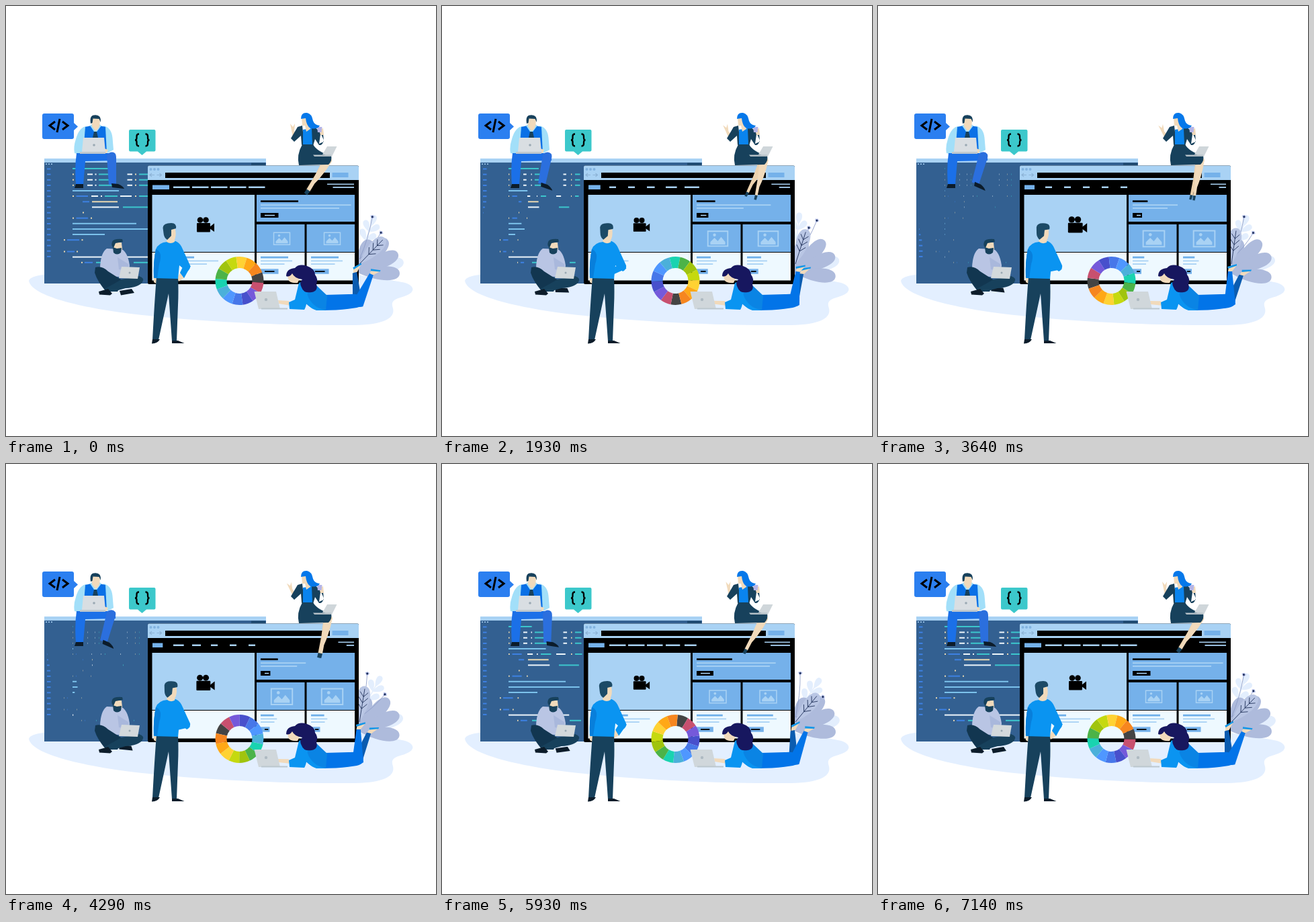
These frames come from a looping animation (640 by 640 pixels, 7.21 s). An HTML page:

```html
<!DOCTYPE html>
<html lang="en">
<head>
<meta charset="utf-8">
<title>Web design team</title>
<style>
html, body { margin: 0; width: 100%; height: 100%; overflow: hidden; background: #fff; }
svg { display: block; width: 100%; height: 100%; }
.navy { fill: #17415c; }
.skin { fill: #f1dabb; }
.light { fill: #a9d2f4; }
.blue { fill: #75b1ea; }
.pale { fill: #eef9ff; }
.grey { fill: #d0d7db; }
.shoe { fill: #0c1c2a; }
.jeans { fill: #1b70e8; }
.shirt { fill: #0a94f1; }
.line { fill: none; stroke: #000; stroke-width: 3; }
.thin { fill: none; stroke: #8db3d6; stroke-width: 1.2; }
</style>
</head>
<body>
<svg viewBox="0 0 640 640">
  <path fill="#e3efff" d="M34 409Q36 402 57 400L525 400C560 408 582 408 597 413C610 419 608 428 590 433C575 437 573 441 576 450C579 463 566 474 520 475C400 476 260 468 170 456C100 446 38 430 34 409Z"/>
  <g id="plants"></g>

  <!-- code editor -->
  <path fill="#336091" d="M57 230H387V413H57Z"/>
  <path class="light" d="M57 227H387V233H57Z"/>
  <path fill="#1f4a70" d="M365 233.500h21v3.500h-21z"/>
  <path class="light" d="M59 234.500h2v1.500h-2zM63 234.500h2v1.500h-2zM67 234.500h2v1.500h-2z"/>
  <g id="code"></g>

  <!-- browser -->
  <rect x="211" y="237.500" width="314" height="176.500" rx="2"/>
  <path class="light" d="M211 259V239.500Q211 237.500 213 237.500H523Q525 237.500 525 239.500V259Z"/>
  <g fill="#82b3df"><circle cx="215.500" cy="243" r="2"/><circle cx="221" cy="243" r="2"/><circle cx="226.500" cy="243" r="2"/></g>
  <path class="thin" d="M221 251.500H214.500M217 249L214 251.500L217 254M224.500 251.500H231M228.500 249L231.500 251.500L228.500 254"/>
  <path d="M237 248H482V256H237Z"/>
  <path class="blue" d="M485.500 248H509.500V255H485.500Z"/>
  <path class="light" d="M217.500 281H370V366H217.500Z"/>
  <path class="blue" d="M373 281H519V321H373ZM373 325H444.500V366H373ZM447.500 325H519V366H447.500Z"/>
  <path class="pale" d="M217.500 367H370V408.500H217.500ZM373 367H444.500V408.500H373ZM447.500 367H519V408.500H447.500Z"/>
  <g id="camera">
    <circle cx="289" cy="318.500" r="4.300"/><circle cx="297.500" cy="318.500" r="4.300"/>
    <rect x="284" y="323" width="20" height="13.500" rx="1"/>
    <path d="M303 329L310 323.500V336L303 331Z"/>
  </g>
  <g id="images"></g>
  <g id="page"></g>

  <!-- speech bubbles -->
  <path fill="#2b7ff0" d="M57 160H98Q101 160 101 163V174L107 179.500L101 185V195Q101 198 98 198H57Q54 198 54 195V163Q54 160 57 160Z"/>
  <path class="line" d="M73 172L65 178L73 184M80 168L76 188M84 172L92 178L84 184"/>
  <path fill="#3cc8cb" d="M185 184H220.500Q222.500 184 222.500 186V214.500Q222.500 216.500 220.500 216.500H209L202.500 222L196 216.500H185Q183 216.500 183 214.500V186Q183 184 185 184Z"/>
  <path class="line" style="stroke-width:2.300" d="M198 190.500Q194.500 190.500 194.500 194V196.500Q194.500 199.500 192 199.500Q194.500 199.500 194.500 202.500V205Q194.500 208.500 198 208.500M207.500 190.500Q211 190.500 211 194V196.500Q211 199.500 213.500 199.500Q211 199.500 211 202.500V205Q211 208.500 207.500 208.500"/>

  <!-- man on the editor -->
  <path fill="#a2dff9" d="M120 179Q109 180 104 198Q100 210 102 219L113 222L117 200ZM145 178Q157 181 158.500 196L160 214L151 219L146 200Z"/>
  <path fill="#0a70e6" d="M118 180L127 178H139L148 180L150 219H115Z"/>
  <path fill="#a2dff9" d="M125 178L128 176H139L142 178L133 190Z"/>
  <path class="navy" d="M131 187H135L137 196H129Z"/>
  <path class="skin" d="M127 166H140L139.500 177Q138 184 133 186L128 179Z"/>
  <path class="navy" d="M126 175Q124 163 131 162.500Q142 161 141 173L138.500 168L129.500 167.500L128.500 174Z"/>
  <path class="jeans" d="M105 219H157Q164 220 163 230L118 231L115 266H104Q102 240 105 219Z"/>
  <path class="shoe" d="M104 265H115V271H102Z"/>
  <g id="shin">
    <path fill="#2b6fde" d="M150 222Q156 215 162 219Q164 221 164 226V266H153Z"/>
    <path class="shoe" d="M157 264L167 265Q174 268 176 272L158 270Z"/>
  </g>
  <path class="skin" d="M146 212L152 214L150 219H144Z"/>
  <path fill="#d9dee2" d="M115 196H146L148 217H113Z"/>
  <path fill="#bfc8ce" d="M110 217H148V220H110Z"/>
  <circle cx="131" cy="207" r="1.800" fill="#9aa9b3"/>

  <!-- man sitting cross-legged -->
  <path class="shoe" id="toe" d="M169 424L187 421L191 427L171 430.500Z"/>
  <path fill="#b9c5e4" d="M150 361Q141 367 140 389L152 402L182 404L184 386Q181 366 172 362Z"/>
  <path fill="#a9b8dc" d="M166 374L182 384L183 394L168 392Z"/>
  <path class="skin" d="M160 352H172L173 362L166 367L160 363Z"/>
  <path class="navy" d="M158 351Q160 346 173 347L174 351L163 353L160 360Q156 357 158 351ZM159 359L165 361L172 360L171 367Q165 372 160 367Z"/>
  <path fill="#123650" d="M133 389Q143 386 152 395L174 409L170 417L166 425H149Q136 410 132 397Z"/>
  <path class="navy" d="M147 421L172 407L198 402Q207 405 203 411Q197 419 178 420L160 425Z"/>
  <path class="shoe" d="M138 425L152 421L158 428L155 430.500L139 429.500Z"/>
  <path fill="#d3d9dc" d="M172 388L199 389L196 406L168 405Z"/>
  <circle cx="184" cy="397" r="1.500" fill="#9aa9b3"/>

  <g id="wheel"></g>

  <!-- standing man -->
  <g id="forearm">
    <path class="skin" d="M260 396L266 404L257 410L255 404Z"/>
    <path class="shirt" d="M275 387L265 405L259 397L265 384Z"/>
  </g>
  <path class="skin" d="M219 402L226 405L225 414L220 411Z"/>
  <path class="navy" d="M224 403H256Q257 425 256 445L254 499H247L242 428L227 497H218Q221 440 224 403Z"/>
  <path class="shoe" d="M218 496L229 496Q226 502 217 502.500ZM247 498H256L265.500 502H247Z"/>
  <path class="shirt" d="M223 362Q227 352 240 351L252 350Q259 352 263 362Q268 373 274 386Q275 392 269 395L258 386L256 406L220 405Q219 380 223 362Z"/>
  <path fill="#087fdb" d="M223 362Q234 366 228 384L225 405L220 404Q219 380 223 362Z"/>
  <g id="head">
    <path class="skin" d="M240 343H251L251 351Q245 355 239 351ZM243 330L252 332Q254 344 250 349L242 346Z"/>
    <path fill="#1c4a66" d="M233.500 330Q234 323 246 323Q254 323 253 331L246 333L246 342L240 348Q235 345 234.500 338Z"/>
  </g>

  <!-- woman on the browser -->
  <g id="legA"><path fill="#ecd2ae" d="M473 228Q479 220 486 228Q486 250 481 270V284H477L476 258Z"/><path class="navy" d="M477 283H481L480.500 290H477Z"/></g>
  <g id="legB"><path class="skin" d="M473 228Q479 220 486 228Q486 250 481 270V284H477L476 258Z"/><path class="navy" d="M477 283H481L480.500 290H477Z"/></g>
  <path class="navy" d="M441 206H457Q463 217 484 223Q486 230 480 236L436 237Q432 222 441 206Z"/>
  <path fill="#cfd6da" d="M471 221L478 209H492.500L485 224Z"/>
  <path fill="#b4bfc6" d="M457 221.500H484L483 224H459Z"/>
  <g id="hand"><path class="skin" d="M427 196L425 185L423 175L427 180L430 175L429 186L433 194Z"/></g>
  <path class="navy" d="M441 178L434 180L424 197L429 202L439 193L440 207L444 206ZM455 179Q466 181 473 200Q471 208 466 207L460 198L457 208L454 204ZM466 205L473 202L472 190L468 191Z"/>
  <path fill="#0a84ee" d="M442 184L455 182L456 206H442Z"/>
  <path class="skin" d="M468 192L466 184L472 182L473 192ZM440 166H446L449 177L453 183L447 187L445 178H441Z"/>
  <path fill="#b5b5e6" d="M463 180H470.500L469.500 188H464Z"/>
  <path fill="#0578ea" d="M439 168Q439 158 448 159Q455 160 457 171Q459 177 467 178Q464 184 453 182Q447 178 446 167Z"/>

  <!-- woman lying down -->
  <g id="farLeg">
    <path fill="#0b5cb0" d="M516 442L519 398L525 392L530 442Z"/>
    <path class="skin" d="M520 397L521 389L532 386L526 396Z"/>
    <path fill="#1597e8" d="M520 389L533 383L533 385.500L521 392Z"/>
  </g>
  <path fill="#0274e8" d="M474 430L512 429Q529 427 531 436Q534 446 522 449Q500 453 470 453Z"/>
  <g id="nearLeg">
    <path fill="#0274e8" d="M515 444L521 394H527L532 444Q524 451 515 444Z"/>
    <path class="skin" d="M521 395L522 388L534 386L527 395Z"/>
    <path fill="#1597e8" d="M520 388L534 384V386.500L521 391Z"/>
  </g>
  <path fill="#0a84e4" d="M440 411Q452 404 460 414L478 431L476 453H464Q446 448 438 430Z"/>
  <path class="skin" id="fingers" d="M405 438L421 439L424 446L406 443Z"/>
  <path class="shirt" d="M436 412Q446 408 449 420Q449 444 444 452L422 451L421 441L430 437ZM447 424Q452 448 476 453H462Q446 448 443 430Z"/>
  <path class="skin" d="M418 399L431 396L438 404L434 412Q426 413 421 409Z"/>
  <path fill="#17175f" d="M417 402Q417 391 430 390Q436 383 448 387Q460 391 460 400Q465 406 462 414Q465 424 455 426Q443 428 440 419Q436 412 441 407Q429 405 426 398Q422 404 417 402Z"/>
  <path class="grey" d="M369.500 425H402L408 451H376Z"/>
  <path fill="#bcc7ce" d="M380 449.500H419V451.500H380Z"/>
  <circle cx="387" cy="437" r="2.200" fill="#aebac2"/>
</svg>
<script>
const LOOP = 7210;
const $ = id => document.getElementById(id);

function add(parent, tag, attrs) {
  const el = document.createElementNS("http://www.w3.org/2000/svg", tag);
  for (const key in attrs) el.setAttribute(key, attrs[key]);
  return parent.appendChild(el);
}

function ease(x) {
  x = Math.min(1, Math.max(0, x));
  return x < .5 ? 4 * x ** 3 : 1 - 4 * (1 - x) ** 3;
}

// Falls from 1 to 0 between d0 and d1, climbs back between u0 and u1.
const wave = (d0, d1, u0, u1) => t =>
  t < u0 ? 1 - ease((t - d0) / (d1 - d0)) : ease((t - u0) / (u1 - u0));
const main = wave(100, 3200, 3600, 7000);
const lead = wave(0, 2950, 3100, 7060);
const late = wave(500, 3700, 4000, 7200);
const turn = t => 2 * Math.PI * t / LOOP;

const updates = [];

function bar(parent, x, y, w, h, fill, min, pace, fromRight) {
  const el = add($(parent), "rect", { x, y, height: h, fill });
  updates.push(t => {
    const width = min + (w - min) * pace(t);
    el.setAttribute("width", width);
    if (fromRight) el.setAttribute("x", x + w - width);
  });
}

function swing(el, cx, cy, angle) {
  updates.push(t => el.setAttribute("transform", `rotate(${angle(t)} ${cx} ${cy})`));
}

// Editor lines
const W = "#eef6fb", T = "#3cc6cd", B = "#3d80e2", C = "#7cc2ec", S = "#ead9b2";
const lowRows = wave(100, 3000, 3400, 7000);
const midRows = wave(250, 3400, 3900, 7100);
const topRows = wave(500, 3500, 4100, 7200);

function codeRow(y, pace, ...spans) {
  for (const [x, w, fill] of spans) bar("code", x, y - 1, w, 2, fill, .4, pace);
}
codeRow(242, wave(1000, 3600, 4400, 7200), [99, 55, T]);
for (const y of [250.5, 258.7, 266.8])
  codeRow(y, topRows, [99, 2, S], [121, 8, W], [132.5, 2, W], [138, 26, T], [180.5, 7.5, W], [192, 2, S], [198, 13, T]);
codeRow(275, midRows, [99, 69, C]);
codeRow(283, midRows, [99, 2, S], [104.5, 17.5, B], [127, 10, W], [141, 2, W], [147, 19, T], [170, 17, W], [192, 2, S], [198, 13, T]);
codeRow(291.3, midRows, [114, 10, B], [128, 38, S]);
codeRow(299.4, midRows, [128, 40, W], [174, 37, T]);
codeRow(307.5, midRows, [114, 2, S]);
codeRow(315.7, midRows, [99, 2, S], [104.5, 17.5, B], [126, 2, S]);
codeRow(323.8, lowRows, [99, 95, C]);
codeRow(332, lowRows, [99, 118, C]);
codeRow(340, lowRows, [99, 48, C]);
codeRow(348.2, midRows, [86, 2, S], [91, 18, B], [112.5, 2, S]);
codeRow(365.5, midRows, [86, 2, S], [91, 11, B], [105, 2, S]);
codeRow(373.6, midRows, [99, 112, W]);
codeRow(381.8, midRows, [112, 2, S], [117, 12, B], [134, 20, T], [190, 21, T]);
for (let i = 0; i < 17; i++) {
  const gone = 1200 + (16 - i) * 115;
  bar("code", 61, 241.5 + i * 8.15, 5.5, 2, B, 0, wave(gone - 600, gone, gone + 1600, gone + 2400));
}

// Browser content
const LIGHT = "#a9d2f4", BLUE = "#6fafea";
bar("page", 218, 266.5, 25, 6.5, "#75b1ea", 15, main);
[[0, 1500, 3600, 5100], [250, 2050, 3600, 5450], [500, 2550, 4000, 6600], [900, 2900, 4200, 7000], [1000, 3600, 4600, 7200]]
  .forEach((times, i) => bar("page", 249 + 28 * i, 268.5, 24.5, 2.5, LIGHT, 10, wave(...times)));
bar("page", 478, 264.5, 40, 1.5, LIGHT, 23, main, true);
bar("page", 486.5, 269, 31.5, 1.8, LIGHT, 10.5, main, true);
bar("page", 379, 289.3, 56, 2.7, "#000", 22, lead);
bar("page", 379, 295.3, 134.5, 1.8, LIGHT, 67, late);
bar("page", 379, 300, 117, 1.8, LIGHT, 52, main);
bar("page", 379, 308, 26.5, 7, "#000", 14, main);
bar("page", 385, 310.8, 15, 1.6, LIGHT, 6, main);
bar("page", 223, 372.7, 57, 2.8, BLUE, 22, lead);
bar("page", 223, 378.5, 93, 1.8, LIGHT, 40, main);
bar("page", 223, 383.2, 76, 1.8, LIGHT, 34, main);
for (const x of [379, 454]) {
  bar("page", x, 372.7, 41, 2.8, BLUE, 17, lead);
  bar("page", x, 378.5, 47, 1.8, LIGHT, 23.5, main);
  bar("page", x, 383.2, 35.5, 1.8, LIGHT, 20, main);
  bar("page", x, 391.3, 26.5, 7.5, "#75b1ea", 13, main);
  bar("page", x + 6, 394.2, 14.5, 1.8, "#000", 5, main);

  const icon = add($("images"), "g", {});
  add(icon, "path", { d: "M-12-9H12V9H-12Z", fill: "none", stroke: LIGHT, "stroke-width": 1.5 });
  add(icon, "path", { d: "M-9 7V4L-4-1L0 3L4-2L9 4V7Z", fill: LIGHT });
  add(icon, "circle", { cx: -4, cy: -4.5, r: 1.8, fill: LIGHT });
  updates.push(t => icon.setAttribute("transform", `translate(${x + 31.5} 346.3) scale(${1.32 - .32 * main(t)})`));
}
updates.push(t => {
  const size = .9875 + .0575 * Math.cos(2 * turn(t)) - .045 * Math.cos(turn(t));
  $("camera").setAttribute("transform", `translate(297 326) scale(${size}) translate(-297 -326)`);
});

// Colour wheel
const hues = ["#444", "#c8506f", "#7559da", "#4850cc", "#4777e9", "#4f97ff", "#4bb0da", "#19d3b0", "#4cb348", "#a0c40e", "#c5d90f", "#ffd233", "#ffa816", "#f6861f"];
const step = 2 * Math.PI / hues.length;
hues.forEach((stroke, i) => {
  const point = a => `${347.5 + 27.5 * Math.cos(a)} ${409 + 27.5 * Math.sin(a)}`;
  const a = (i - .5) * step;
  add($("wheel"), "path", { d: `M${point(a)}A27.5 27.5 0 0 1 ${point(a + step)}`, fill: "none", stroke, "stroke-width": 17 });
});
swing($("wheel"), 347.5, 409, t => -8 + 360 * t / LOOP);

// Plants: each one grows upward from its base and leans by an angle
function plant(x, y, angle) {
  const pot = add(add($("plants"), "g", { transform: `translate(${x} ${y})` }), "g", {});
  swing(pot, 0, 0, angle);
  return pot;
}
const leaf = (pot, length, width, fill, transform = "") => add(pot, "path", {
  d: `M0 0C${-width} ${-length * .5} ${-width} ${-length} 0 ${-length}C${width} ${-length} ${width} ${-length * .5} 0 0`, fill, transform
});
const sway = t => Math.sin(turn(t));

const PALE = "#e3eefd", LILAC = "#aebbdc", INK = "#1b2c55";
const sprig = plant(525, 375, t => 21 - 15 * sway(t));
add(sprig, "path", { d: "M0 0V-55", stroke: PALE, "stroke-width": 1.5 });
for (const y of [-28, -42]) for (const side of [-40, 40]) leaf(sprig, 18, 6, PALE, `translate(0 ${y}) rotate(${side})`);
leaf(sprig, 18, 6, PALE, "translate(0 -50)");
leaf(plant(525, 398, t => 72 + 3 * main(t)), 69, 13, PALE);

function flower(length, angle) {
  const pot = plant(526, 377, angle);
  add(pot, "path", { d: `M0 0Q4 ${-length / 2} 0 ${-length}`, fill: "none", stroke: "#8d9cc6", "stroke-width": .8 });
  add(pot, "path", { d: `M0 ${-length + 4}L-3.5 ${-length - 1}L0 ${-length - 3}L3.5 ${-length - 1}Z`, fill: "#b8c2ea" });
  add(pot, "circle", { cy: -length, r: 1.5, fill: INK });
}
[[20, 52, 4], [41, 66, -3], [64, 66, -4], [91, 62, -6]].forEach(([angle, length, bend]) =>
  leaf(plant(524, 397, t => angle - bend * (1 - main(t))), length, 14, LILAC));
flower(66, t => 17 + 12 * sway(t));
flower(51, t => 39 - 16 * sway(t));

const veined = plant(526, 384, t => 8 + 36 * main(t));
leaf(veined, 54, 13, "#b9c6e4");
add(veined, "path", {
  d: "M0 0V-50M0-20L-7-28M0-20L7-28M0-29L-7-37M0-29L7-37M0-38L-6-45M0-38L6-45",
  fill: "none", stroke: INK, "stroke-width": .8
});

// Limbs
const rest = t => 1 - main(t);
swing($("shin"), 158, 222, t => 18 * rest(t));
swing($("toe"), 192, 418, t => 16 * rest(t));
swing($("forearm"), 269, 388, t => 50 * rest(t));
swing($("head"), 243, 352, t => 6 * rest(t));
swing($("hand"), 430, 197, t => -16 * (1 - lead(t)));
swing($("legA"), 480, 228, t => 13 + 20 * late(t));
swing($("legB"), 480, 228, t => 8 + 23 * lead(t));
swing($("nearLeg"), 524, 444, t => 24 * main(t));
swing($("farLeg"), 522, 442, t => 24 - 28 * main(t));
swing($("fingers"), 424, 445, t => -3 * rest(t));

function frame() {
  const t = performance.now() % LOOP;
  for (const update of updates) update(t);
  requestAnimationFrame(frame);
}
frame();
</script>
</body>
</html>
```
